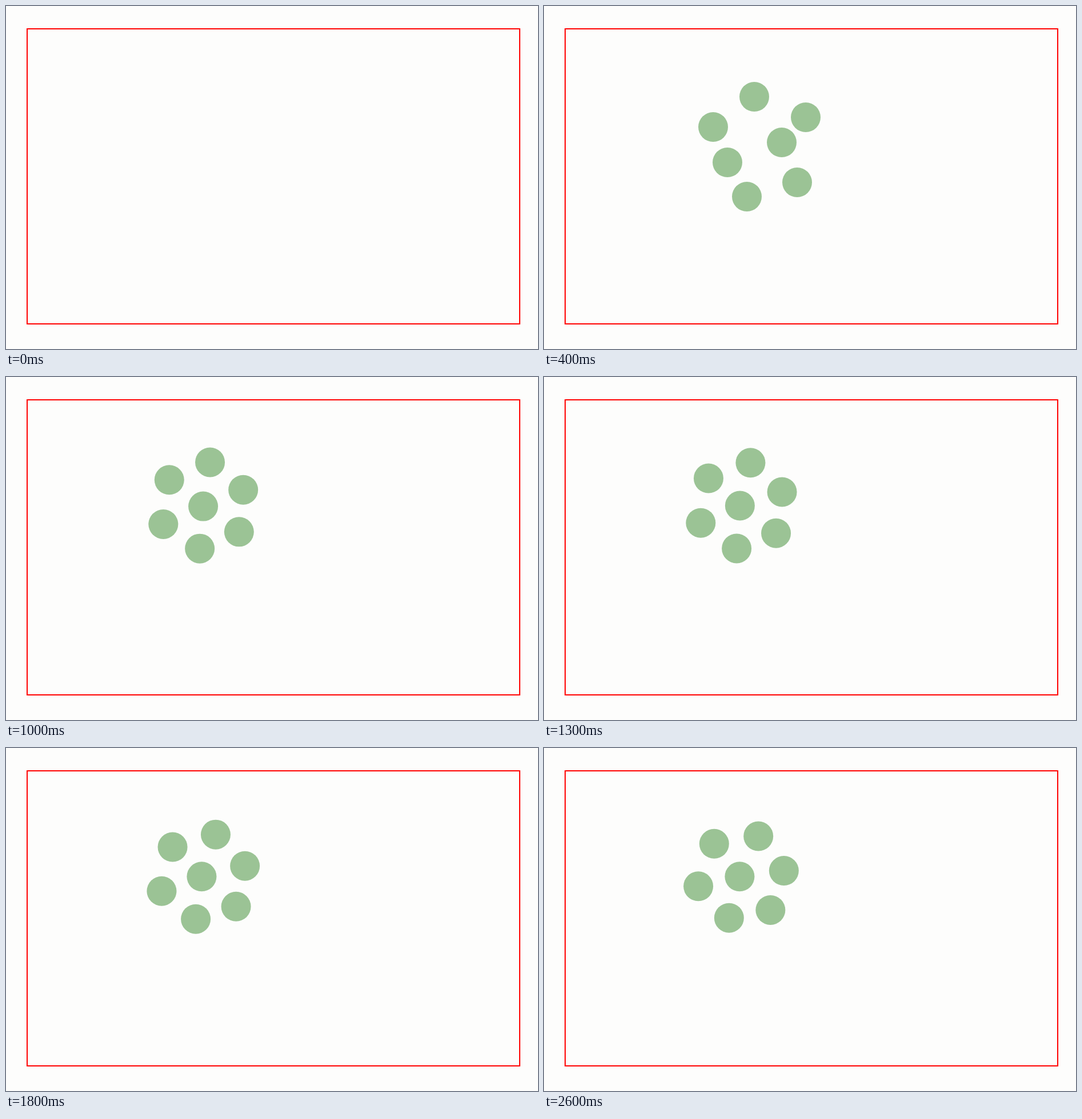
Animation, 931 px wide and 601 px high, one loop 2.7 s. Source, as an HTML page:

```html
<!DOCTYPE html>
<html lang="en">
<head>
<meta charset="utf-8">
<title>Gathering discs</title>
<style>
  html, body { margin: 0; width: 100%; height: 100%; overflow: hidden; background: #fdfdfc; }
  svg { display: block; }
</style>
</head>
<body>
<svg width="931" height="601" viewBox="0 0 931 601">
  <rect x="37" y="40" width="862" height="517" fill="none" stroke="#f00" stroke-width="2"/>
  <g id="discs" fill="#9bc395"></g>
</svg>
<script>
const LOOP = 2700, STEP = 100;
const MEET = 400, FORMED = 700; // the swarm closes in, then becomes a ring
const CENTER = { x: 345.5, y: 225.8 };
const RADIUS = 26;

// Where the swarm is at MEET: six ring discs clockwise, then the core
const SWARM = [
  [368, 159], [458, 195], [443, 309], [355, 334], [321, 274], [296, 212], [416, 239]
].map(([x, y]) => ({ x, y }));
const CORE = SWARM.length - 1;

const rad = deg => deg * Math.PI / 180;
const mix = (a, b, u) => ({ x: a.x + (b.x - a.x) * u, y: a.y + (b.y - a.y) * u });

// Place in the slowly turning ring; the off-centre core pushes its neighbours aside
function slot(k, t) {
  const unsettled = Math.exp(-Math.max(0, t - FORMED) / 170);
  if (k === CORE) return { x: 342.4 + 15.6 * unsettled, y: 225.3 + 7.7 * unsettled };
  const turn = 0.0081 * (t - FORMED) - 85.7;
  const push = (3 - 6.3 * unsettled) * Math.cos(rad(60 * k - 13));
  const angle = rad(60 * k + turn + push);
  const r = k % 2 ? 75.1 : 77.2;
  return { x: CENTER.x + r * Math.cos(angle), y: CENTER.y + r * Math.sin(angle) };
}

function position(k, t) {
  if (t < MEET) return mix(CENTER, SWARM[k], 1.35 ** ((MEET - t) / STEP));
  const left = Math.max(0, (FORMED - t) / (FORMED - MEET));
  return mix(slot(k, t), SWARM[k], left ** 1.3);
}

const group = document.getElementById("discs");
const discs = SWARM.map(() => {
  const c = document.createElementNS("http://www.w3.org/2000/svg", "circle");
  c.setAttribute("r", RADIUS);
  return group.appendChild(c);
});

function draw(now) {
  const t = Math.floor((now % LOOP) / STEP) * STEP;
  group.setAttribute("visibility", t < STEP ? "hidden" : "visible");
  discs.forEach((disc, k) => {
    const { x, y } = position(k, t);
    disc.setAttribute("cx", x.toFixed(2));
    disc.setAttribute("cy", y.toFixed(2));
  });
}

const start = performance.now();
function tick() {
  draw(performance.now() - start);
  requestAnimationFrame(tick);
}
tick();
</script>
</body>
</html>
```
